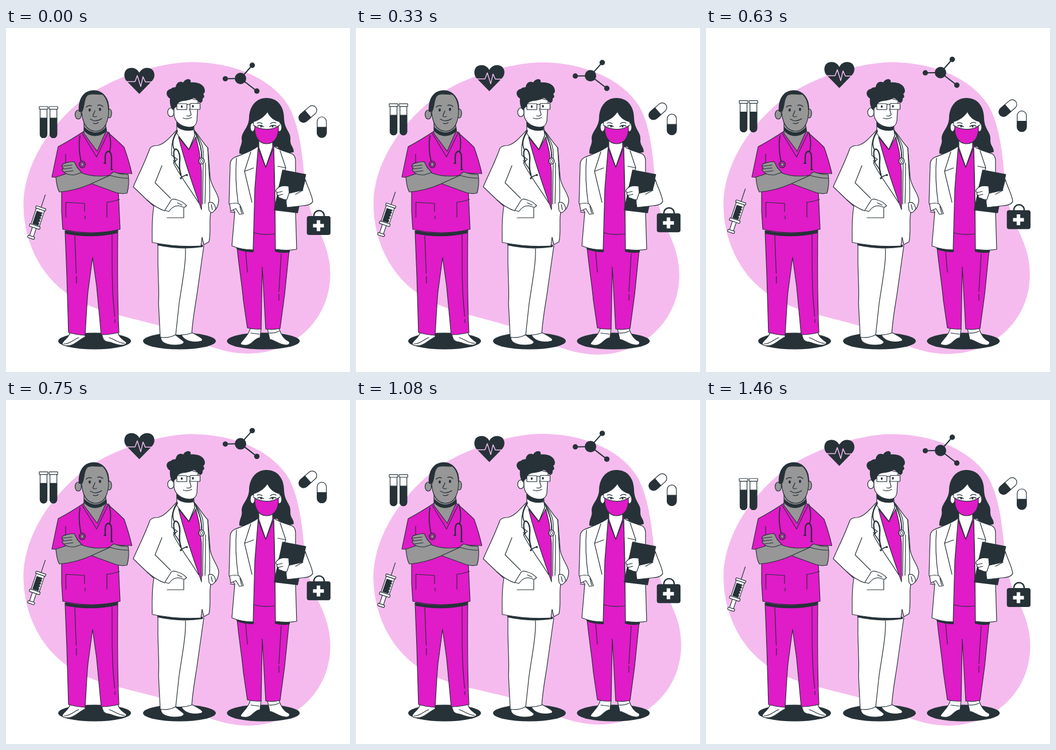
Write an HTML page with a canvas that moves like this. It is 600 px wide and 600 px high and loops after 1500 ms.

```html
<!DOCTYPE html>
<html lang="en">
<head>
<meta charset="utf-8">
<title>Medical team</title>
<style>
  html, body { margin: 0; width: 100%; height: 100%; overflow: hidden; background: #fff; }
  canvas { display: block; width: 600px; height: 600px; }
</style>
</head>
<body>
<canvas id="stage" width="600" height="600"></canvas>
<script>
const ctx = document.getElementById('stage').getContext('2d');
const INK = '#263238', WHITE = '#fff', MAGENTA = '#e01bc8', PALE = '#f5bbee', SKIN = '#979797';
const LOOP = 1500, STEPS = 36, LIFT = 12;

const paths = new Map();
function path(d) {
  if (!paths.has(d)) paths.set(d, new Path2D(d));
  return paths.get(d);
}
function fill(d, color) {
  ctx.fillStyle = color;
  ctx.fill(path(d));
}
function line(d, width = 1.2, color = INK) {
  ctx.strokeStyle = color;
  ctx.lineWidth = width;
  ctx.stroke(path(d));
}
function shape(d, color, width) {
  fill(d, color);
  line(d, width);
}
function ellipse(x, y, rx, ry = rx, color = INK, width = 0) {
  ctx.beginPath();
  ctx.ellipse(x, y, rx, ry, 0, 0, Math.PI * 2);
  ctx.fillStyle = color;
  ctx.fill();
  if (width) {
    ctx.strokeStyle = INK;
    ctx.lineWidth = width;
    ctx.stroke();
  }
}
function box(x, y, w, h, color = WHITE, radius = 0, outline = 1.2) {
  ctx.beginPath();
  ctx.roundRect(x, y, w, h, radius);
  ctx.fillStyle = color;
  ctx.fill();
  if (outline) {
    ctx.strokeStyle = INK;
    ctx.lineWidth = outline;
    ctx.stroke();
  }
}
function placed(x, y, degrees, draw) {
  ctx.save();
  ctx.translate(x, y);
  ctx.rotate(degrees * Math.PI / 180);
  draw();
  ctx.restore();
}

function blob(degrees) {
  placed(298, 314, degrees, () => {
    ctx.translate(-298, -314);
    fill('M325 59.5C395 60 460 86 491 133C509 162 516 210 519.5 250C523 300 532 325 548 358C558 380 565 400 565.5 428C566 510 500 568 422 568C365 567 330 542 290 527C265 517 235 511 205 503C155 491 115 475 85 445C50 410 30.5 360 30.5 308C31 240 75 170 137 122C177 91 262 59.5 325 59.5Z', PALE);
  });
}

function nurse() {
  shape('M112 531C109 541 98 546 98 551Q100 555 111 554C121 552 128 543 138 539V534Z', WHITE);
  line('M101 551C112 551 118 543 127 540');
  shape('M167 533C168 541 170 546 176 547C186 548 192 554 204 553Q211 552 210 548C204 543 198 541 195 531Z', WHITE);
  line('M180 540C190 543 195 550 207 550');
  // trousers
  shape('M103 354L106 430L109 531Q122 535 138 536C140 505 141 480 143 460L151 400L158 450L166 535Q181 535 197 531C195 490 194 450 195 352Z', MAGENTA);
  line('M120 362L122.5 428M122.8 433V445M185 360C185 420 185 455 188 486L189.5 503M190 508V514');
  fill('M103 353Q150 363 195 351L194 358Q150 368 104 359Z', INK);
  // tunic
  shape('M136 180C124 188 108 198 91 207L80 260L97 261L97 320L99 351Q150 363 199 351L196 286L192 253L219.5 254C216 238 211 222 206 208C198 200 187 190 175 180Z', MAGENTA);
  line('M104.5 330V304L137 306V320M138 328V333M198 299Q186 303 176 304V330M104 220V236');
  // neck and collar
  shape('M136 160V184L159 215L174 181V160Z', SKIN);
  line('M133 184L158 225L179 181');
  fill('M136 172C147 184 163 187 175 172L176 179C162 193 145 190 136 179Z', INK);
  // head
  ellipse(126, 151, 5.5, 8, SKIN, 1.2);
  ellipse(180, 149, 4.2, 8, SKIN, 1.2);
  shape('M132 142C132 162 139 179 155 180C172 181 179 164 179 142C180 122 170 112 152 112C138 113 132 126 132 142Z', SKIN);
  fill('M127 146C125 122 137 108.5 153 108.5C170 109 180 122 180 143L178 143C178 131 174 121 168 116C158 117 149 114 142 118C136 125 138 137 133 146Z', INK);
  ellipse(146, 143, 1.9, 2.8);
  ellipse(164, 142, 1.9, 2.8);
  line('M140 138Q144 134 149 136M160 135Q165 133 169 137', 1.5);
  line('M155 144C155 149 150 151 152 154Q155 156 158 154M147 159Q157 165 167 158M152 166Q157 168 161 165');
  // stethoscope
  line('M129 188C126 205 128 220 131 233M180 183C183 195 183 207 181 215', 1.8);
  line('M173 235V225C173 212 184 212 184 225V245', 2.3);
  line('M171 236H174M183 247H186', 2);
  ellipse(133, 238, 5.2, 5.8, MAGENTA, 1.5);
  ellipse(133, 238, 2.7, 3, SKIN, 1);
  // crossed arms: the far one first, then the near forearm and the resting hand
  shape('M148 271L181 257Q185 252 188 251Q201 256 213 255C215 265 214 279 211 288Q202 290 192 287Z', SKIN);
  line('M181 257Q198 262 213 262');
  shape('M87 260C88 271 90 281 93 286Q120 284 148 272L181 257Q150 261 130 252L118 250Z', SKIN);
  shape('M119 233C110 233 99 236 98 239Q96 242 100 244Q96 248 100 250C103 255 112 257 120 256L132 252L124 243Z', SKIN);
  line('M98 241Q108 240 115 239M100 246L115 244M102 251L117 249');
}

function doctor() {
  shape('M272 535C266 544 274 553 295 553C310 553 313 548 308 545L294 534Z', WHITE);
  shape('M305 533C309 546 325 550 341 546C346 543 339 539 324 531Z', WHITE);
  shape('M265 377C264 440 268 450 266 480L269 539Q282 542 296 535Q310 537 324 532C326 505 330 485 333 465L345 380Z', WHITE);
  line('M313 385C314 410 308 440 302 480L296 535');
  fill('M264 374Q300 382 343 378V382Q304 388 264 379Z', INK);
  // coat
  shape('M299 177C288 188 278 202 264 205Q254 205 251 210C242 235 230 258 222 277L246 300L258 311C254 330 255 350 255 374Q300 383 340 380L342 365L345 378L354 373C358 355 354 335 357 322Q370 318 371 300C370 287 358 278 356 260L352 209C342 198 336 187 327 177Z', WHITE);
  line('M246 300Q262 314 277 319M272 240L260 270L287 297M352 209C353 245 357 275 355 304');
  // shirt and neckline
  shape('M301 190L319 212L331 190L337 215L341 250V317C330 285 313 240 301 190Z', MAGENTA);
  shape('M298 165V184L319 212L329 188L327 165Z', WHITE);
  line('M301 190L319 212L329 188M299 178C290 190 288 207 289 222L299 229L292 235C304 260 324 284 336 305M327 178C338 193 345 205 344 222L343 307M348 235C348 260 348 280 347 306');
  // hands and pockets
  shape('M277 318L287 302Q289 296 299 300Q308 302 315 310L311 313L301 310C292 310 288 315 284 320Z', WHITE);
  line('M281 331H310V314M299 305L307 309');
  shape('M353 305Q360 302 364 309L366 315Q361 323 357 322L354 318Z', WHITE);
  line('M358 308L360 317');
  // stethoscope
  line('M299 180C291 192 289 202 293 211M329 181C338 199 342 212 341 227', 1.8);
  line('M295 233C288 207 299 207 302 219C306 230 299 238 305 256', 2.3);
  line('M292 231C297 240 304 244 306 260L315 256', 1.5);
  ellipse(305, 262, 1.8);
  ellipse(315.5, 256.5, 1.8);
  ellipse(341, 232, 4.8, 5.3, WHITE, 1.5);
  ellipse(341, 232, 2.4, 2.6, WHITE, 1);
  // head
  fill('M297 163C305 172 316 174 328 171L327 178C315 181 304 178 298 172Z', INK);
  ellipse(287.5, 147, 5.5, 7.7, WHITE, 1.2);
  shape('M293 130L293 151C294 163 305 173 321 173Q331 173 333 162L335 126L310 120Z', WHITE);
  fill('M291 143C288 140 285 133 286 123C278 118 278 108 288 106C290 103 294 104 296 103C297 95 304 92 309 95C314 87 324 88 322 95C336 94 346 99 347 109Q347 113 344 115Q348 120 343 123Q344 128 339 131C334 128 333 123 327 122C318 128 309 126 303 129C298 131 300 137 295 139Z', INK);
  box(298, 132, 17.5, 10.5, WHITE, 1);
  box(321, 131.5, 17.5, 10.5, WHITE, 1);
  line('M290 131L298 133M315.5 134Q318 132 321 134');
  ellipse(306.5, 137, 1.6, 2.3);
  ellipse(326, 136.5, 1.6, 2.3);
  line('M320 141L323 151Q321 155 315 153M309 157Q316 160 324 156');
}

function surgeon() {
  fill('M454 122C436 122 425 137 424 155C424 174 411 180 411 193C413 203 406 208 407 219C418 222 430 215 438 207H473C479 216 490 221 502 216C502 207 495 205 496 194C497 181 486 178 485 158C485 137 474 122 454 122Z', INK);
  shape('M426 524C424 536 409 547 409 551Q411 554 421 553C430 552 433 541 443 540L445 524Z', WHITE);
  shape('M456 524L460 543C469 544 476 553 489 553Q496 553 494 547C485 543 480 536 476 524Z', WHITE);
  line('M459 532Q468 533 476 529M427 532L442 534');
  // trousers
  shape('M403 382C406 415 412 450 414 475L421 523Q433 526 445 525L447 417L453 525Q466 527 478 524L486 465L494 386L469 355H432Z', MAGENTA);
  line('M418 389L421 426M480 394L476 460M476 464V475');
  fill('M401 382L432 385V391Q414 391 403 386ZM469 385H495V391Q483 394 469 390Z', INK);
  // tunic and neck
  shape('M440 203L432 300L431 357Q450 362 470 359L467 203Z', MAGENTA);
  shape('M441 195V208L453 243L465 208V195Z', WHITE);
  line('M440 211L453 243L466 211');
  // coat, left side
  shape('M440 206C427 216 412 220 398 226Q391 230 391 238L389 306L399 321L394 380Q411 387 431 387L434 280Z', WHITE);
  line('M402 227C399 260 402 285 405 306M427 216L416 250L432 244M416 250L429 304');
  shape('M390 307Q399 304 407 307L411 315L414 324L407 325L401 315L392 319Z', WHITE);
  line('M408 311L411 323M391 321L399 322');
  // coat, right side
  shape('M467 206C477 214 492 216 500 220Q505 224 505 232L505 320L507 386Q490 389 470 386L469 285Z', WHITE);
  line('M478 214L488 244L474 241M488 244L474 282');
  // clipboard and arm
  fill('M482 247L523.5 255L509 323L467 318Z', INK);
  shape('M522 264C526 278 533 289 535 302Q533 309 518 310L490 313Q487 300 491 289L517 283Z', WHITE);
  shape('M493 276Q479 273 472 281Q469 285 473 287Q471 291 475 292Q474 297 480 297Q483 300 490 299L494 287Z', WHITE);
  line('M473 287L482 285M475 292L483 290M505 290L518 283');
  // face and mask
  ellipse(430, 173, 4, 7.5, WHITE, 1.2);
  ellipse(477, 173, 4, 7.5, WHITE, 1.2);
  fill('M432 164C444 160 451 154 456 147C460 156 468 162 477 164L474 184Q467 201 454 202Q439 200 435 184Z', WHITE);
  line('M438 166Q443 164 447 167M461 167Q466 163 471 166');
  line('M439 171Q444 168 449 172M460 172Q465 168 471 171', 1.6);
  ellipse(445, 171.5, 1.6, 2);
  ellipse(465, 171.5, 1.6, 2);
  shape('M434 171C445 178 463 179 475 171C476 188 470 202 454 202C439 201 433 187 434 171Z', MAGENTA);
  line('M431 169L434 171M478 169L475 171');
}

function testTube(x) {
  box(x + 2, 140, 12, 51.5, WHITE, [0, 0, 6, 6]);
  box(x + 2, 157, 12, 34.5, INK, [0, 0, 6, 6]);
  box(x + 0.5, 137, 15, 4.6, WHITE, 0.8);
}

function syringe() {
  line('M0 0V23');
  box(-9, 23, 18, 4, WHITE, 1);
  box(-7.5, 27, 15, 30);
  box(-5.5, 31, 11, 24, INK, 0, 0);
  line('M4 34H7M4 39H7M4 44H7M4 49H7', 1, WHITE);
  box(-3.5, 59, 7, 18);
  box(-9.5, 56, 19, 4.5, WHITE, 1);
  box(-6, 76, 12, 4.2, WHITE, 1);
}

function capsule() {
  box(-8, -18, 16, 36, WHITE, 8);
  box(-8, 0, 16, 18, INK, [0, 0, 8, 8]);
}

function heart() {
  fill('M232.5 115L210 92C204 85 205 69.5 219 69.5Q228 69.5 232.5 78Q237 69.5 246 69.5C260 69.5 262 85 255 92Z', INK);
  line('M209 93.5H225L229 83L235 102L239 85L243 94H256', 1.5, PALE);
}

function molecule() {
  line('M409 88L429.5 65M409 88L382.5 88.5M409 88L437.5 110', 2);
  ellipse(409, 88, 10);
  ellipse(429.5, 65, 4.7);
  ellipse(382.5, 88.5, 4.6);
  ellipse(437.5, 110, 4.7);
}

function firstAidKit() {
  line('M537 329C536 315 556 315 555 329', 2.4);
  box(524.7, 328, 41.3, 33, INK, 4, 0);
  box(535.5, 341.7, 19, 6.2, WHITE, 0, 0);
  box(541.9, 335.3, 6.2, 19, WHITE, 0, 0);
}

function floatingIcons(lift) {
  ctx.save();
  ctx.translate(0, -lift);
  testTube(57.5);
  testTube(74.7);
  placed(68.5, 291, 18.4, syringe);
  heart();
  molecule();
  placed(526.5, 150, 49, capsule);
  placed(550.8, 173, 0, capsule);
  firstAidKit();
  ctx.restore();
}

// Linear sway: 0, +1, -1, 0 degrees at 0, 25, 75 and 100 percent.
function sway(p) {
  if (p < 0.25) return p * 4;
  return p < 0.75 ? 2 - p * 4 : p * 4 - 4;
}

function draw() {
  const step = Math.floor(performance.now() % LOOP / LOOP * STEPS);
  const p = step / (STEPS - 1);
  ctx.fillStyle = WHITE;
  ctx.fillRect(0, 0, 600, 600);
  ctx.lineCap = ctx.lineJoin = 'round';
  blob(sway(p));
  for (const x of [154.5, 302.5, 448.8]) ellipse(x, 546, 63.5, 14.6);
  floatingIcons(LIFT * (1 - Math.abs(1 - 2 * p)));
  nurse();
  doctor();
  surgeon();
  requestAnimationFrame(draw);
}
draw();
</script>
</body>
</html>
```
